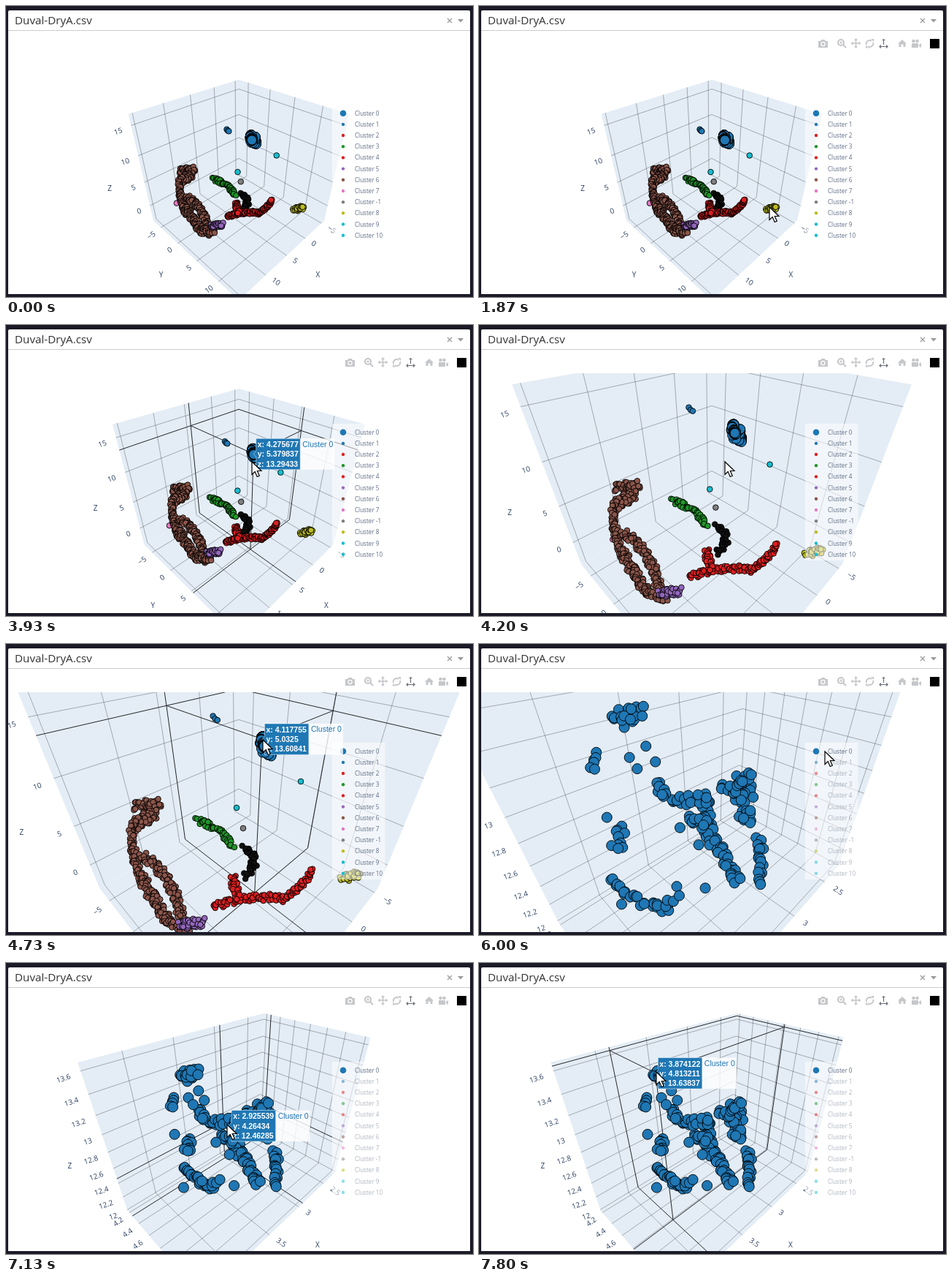
These frames come from a looping animation (640 by 398 pixels, 8 s). An HTML page with a canvas:

```html
<!DOCTYPE html>
<html lang="en">
<head>
<meta charset="utf-8">
<title>3D cluster plot</title>
<style>
html, body { margin: 0; width: 100%; height: 100%; overflow: hidden; background: #1a1b26; }
canvas, svg { position: absolute; left: 0; top: 0; width: 640px; height: 398px; }
.ui { font-family: "Open Sans", sans-serif; }
.tip { font: 10.5px "Liberation Sans", Arial, sans-serif; }
</style>
</head>
<body>
<canvas id="scene" width="640" height="398"></canvas>
<svg class="ui" viewBox="0 0 640 398">
  <path d="M3 8q0-2 2-2H634q2 0 2 2V33.5H3z" fill="#fff"/>
  <path d="M3 33.5H636" stroke="#ccc"/>
  <text x="12" y="25" font-size="15.2" fill="#333">Duval-DryA.csv</text>
  <path d="M605 17l6 6m0-6l-6 6" stroke="#999" stroke-width="1.2"/>
  <path d="M619 18h8l-4 4.5z" fill="#999"/>

  <g id="bar" fill="#c6c7ca" stroke="#c6c7ca" stroke-width="0">
    <path d="M465 48h3l1.5-2h4l1.5 2h3v9h-13z"/>
    <circle cx="471.5" cy="52" r="2.6" stroke="#fff" stroke-width="1.2"/>
    <g fill="none" stroke-width="2.2">
      <circle cx="496" cy="50" r="4"/><path d="M499 53l4 4"/>
      <path d="M494 50h4m-2-2v4" stroke-width="1.2"/>
      <path d="M511 51h11m-5.5-5.5v11" stroke-width="1.6"/>
      <path d="M531 53a4.5 4.5 0 0 1 7-5M540 50a4.5 4.5 0 0 1-7 5" stroke-width="1.8"/>
    </g>
    <path d="M516.5 44l2.5 3h-5zM516.5 58l2.5-3h-5zM509.5 51l3-2.5v5zM523.5 51l-3-2.5v5zM537 45h4v4zM534 57.5h-4v-4z"/>
    <g fill="none" stroke="#6d7078" stroke-width="1.2">
      <path d="M554.5 45v8M552.5 46.500h4M549 55.500h11"/>
      <path d="M551 53.500l-2 2 2 2M558 53.500l2 2-2 2"/>
    </g>
    <path d="M574 51.5l6-5.5 6 5.5h-1.5v4.5h-3v-3.5h-3v3.5h-3v-4.5z"/>
    <path d="M593 51h9v6h-9zM603 53l3-2v6l-3-2z"/>
    <circle cx="595.5" cy="48" r="2.3"/><circle cx="600.5" cy="48" r="2.3"/>
    <path d="M618 45h13v13h-13z" fill="#000"/>
  </g>

  <g id="legend">
    <rect x="447" y="135" width="72.5" height="187" fill="#fff" opacity=".55"/>
  </g>

  <g id="hover" class="tip">
    <rect id="pale" width="47" height="42.5" fill="#fff" opacity=".8"/>
    <path id="box"/>
    <text id="tx"/><text id="ty"/><text id="tz"/><text id="name"/>
  </g>

  <path id="cursor" d="M0 0V17.5L4.2 13.6L7.2 20.5L10.3 19.2L7.3 12.5H13z"
    fill="#fff" stroke="#000" stroke-width="1.2"/>
  <path d="M0 0H640V5H0zM0 394H640V398H0zM0 0H3V398H0zM636 0H640V398H636z" fill="#1a1b26"/>
</svg>
<script>
const LOOP = 8000, CX = 319, CY = 230, F = 396;
const START = 2.165, CLOSE = 1.22, INSIDE = 1.374; // camera distances
const ISOLATED = 6000;
const BLUE = '#1f77b4', RED = '#dc2022', PURPLE = '#9467bd', BROWN = '#8c564b',
  GREEN = '#20962a', PINK = '#e377c2', GRAY = '#7f7f7f', OLIVE = '#bcbd22', CYAN = '#17becf';
const $ = id => document.getElementById(id);
const ctx = $('scene').getContext('2d');

// half: box half sizes, min: data at the low corner, unit: scene units per data unit
const ALL = { half: [.51, .51, .48], min: [-5.89, -7.38, -3.5], unit: .0475, step: [5, 5, 5] };
const ONE = { half: [.64, .387, .505], min: [2.226, 4.158, 11.99], unit: .602, step: [.5, .2, .2] };

// Moves are [start, end, ...value reached]
const zooms = [[3400, 3930, 1.928], [3990, 4200, 1.32], [4270, 4470, CLOSE],
  [6330, 6670, INSIDE], [6730, 7130, 1.74]];
const walks = [[230, 730, 409, 322], [870, 1330, 391, 300], [1530, 1870, 398, 275],
  [2800, 3200, 337, 187], [4270, 4730, 352, 131], [5000, 5330, 474, 147],
  [6330, 6530, 303, 221], [7200, 7600, 243, 149]];
const hovers = [
  { from: 1930, to: 2870, at: [1.096602, 12.7187, 2.612308], name: 'Cluster 8', color: OLIVE, ink: '#444' },
  { from: 3200, to: 4200, at: [4.275677, 5.379837, 13.29433] },
  { from: 4730, to: 5070, at: [4.117755, 5.0325, 13.60841] },
  { from: 6560, to: 7270, at: [2.925539, 4.26434, 12.46285] },
  { from: 7560, to: LOOP, at: [3.874122, 4.813211, 13.63837] }
];

function follow(value, moves, t) {
  for (const [start, end, ...to] of moves) {
    const f = Math.min(1, Math.max(0, (t - start) / (end - start)));
    value = value.map((v, i) => v + (to[i] - v) * f);
  }
  return value;
}

let seed = 7;
const rnd = () => (seed = (seed * 16807) % 2147483647) / 2147483647;

// Points live in camera space: r right, u up, q towards the eye
function dot(list, d, color, q, [x, y]) {
  const w = (d - q) / F;
  list.push({ color, q, r: (x - CX) * w, u: (CY - y) * w });
}

// Scatter points along a bowed strand on screen; the count follows its area
function strand(list, d, area, color, q, spread, [x0, y0], [x1, y1], bow = 0) {
  const dx = x1 - x0, dy = y1 - y0, len = Math.hypot(dx, dy);
  const n = Math.ceil(len * spread / area);
  for (let i = 0; i <= n; i++) {
    const s = i / n, lift = 4 * s * (1 - s) * bow / len;
    const a = rnd() * 2 * Math.PI, r = spread * Math.sqrt(rnd());
    dot(list, d, color, q, [x0 + dx * s - dy * lift + Math.cos(a) * r, y0 + dy * s + dx * lift + Math.sin(a) * r]);
  }
}

const others = [], focus = [];
const far = (...args) => strand(others, CLOSE, 5.5, ...args);
const near = (...args) => strand(focus, INSIDE, 16, BLUE, ...args);
const lone = (color, q, at) => dot(others, CLOSE, color, q, at);

far(BROWN, 0, 7, [176, 222], [209, 218]);
far(BROWN, 0, 9, [202, 231], [174, 250]);
far(BROWN, .05, 5, [172, 250], [188, 330], 4);
far(BROWN, .15, 8, [184, 318], [225, 385]);
far(BROWN, .15, 7, [188, 290], [240, 388], -14);
far(BROWN, .3, 6, [214, 378], [250, 391]);
far(PURPLE, .42, 7, [238, 386], [271, 379]);
far(GREEN, -.22, 4.5, [262, 241], [311, 276], -5);
far('#111', 0, 5, [328, 276], [326, 318], -13);
far(RED, .45, 5, [286, 359], [380, 348], -6);
far(RED, .45, 4, [377, 350], [421, 308], 4);
far(RED, .46, 6, [309, 318], [316, 344]);
far(OLIVE, .13, 6, [461, 320], [485, 316]);
far(BLUE, .395, 1.5, [284, 99], [289, 103]);
lone(PINK, -.1, [173, 298]);
lone(CYAN, -.25, [404, 188]);
lone(CYAN, .3, [316, 224]);
lone(GRAY, .4, [325, 252]);

near(.48, 11, [212, 129], [238, 119], -5);
near(.55, 4, [187, 164], [187, 184]);
near(-.2, 6, [251, 196], [262, 212]);
near(-.3, 7, [270, 216], [310, 215]);
near(-.44, 8, [308, 214], [318, 260]);
near(-.44, 7, [288, 240], [310, 246]);
near(-.33, 11, [338, 200], [364, 190]);
near(-.35, 12, [357, 198], [363, 238]);
near(-.5, 5, [379, 262], [381, 318]);
near(-.4, 8, [322, 268], [350, 315]);
near(.6, 7, [222, 247], [215, 270]);
near(.6, 5, [207, 305], [242, 330]);
near(.5, 7, [248, 336], [279, 330], 3);
for (const at of [[243, 154], [224, 167], [233, 180], [254, 172], [198, 236], [215, 336]])
  dot(focus, INSIDE, BLUE, .4, at);
for (const at of [[280, 249], [303, 270], [276, 321], [311, 323]])
  dot(focus, INSIDE, BLUE, -.1, at);

const byDepth = (a, b) => a.q - b.q;
focus.sort(byDepth);
// The isolated cluster, shrunk to its place among the others
const shrink = ALL.unit / ONE.unit;
const small = focus.map(p => ({ color: BLUE, big: true,
  r: .1 + p.r * shrink, u: .245 + p.u * shrink, q: .166 + p.q * shrink }));
const everything = others.concat(small).sort(byDepth);

let dist = START, view = ALL;
const project = (r, u, q) => [CX + F * r / (dist - q), CY - F * u / (dist - q)];
const place = ([x, y, z]) =>
  project((y - x) * Math.SQRT1_2, (2 * z - x - y) / Math.sqrt(6), (x + y + z) / Math.sqrt(3));
const toBox = (v, i) => (v - view.min[i]) * view.unit - view.half[i];

function path(points) {
  ctx.beginPath();
  points.forEach(p => ctx.lineTo(...place(p)));
}

// The low corner, with some coordinates replaced
const corner = change => view.half.map((h, i) => change[i] ?? -h);

// Lines at value v of axis i on the two back walls that carry it
function wallLines(i, v) {
  for (const k of [0, 1, 2].filter(k => k !== i)) {
    path([corner({ [i]: v }), corner({ [i]: v, [k]: view.half[k] })]);
    ctx.stroke();
  }
}

function label(text, x, y, angle, align) {
  ctx.save();
  ctx.translate(x, y);
  ctx.rotate(angle * Math.PI / 180);
  ctx.textAlign = align;
  ctx.fillText(text, 0, 0);
  ctx.restore();
}

const axes = [
  { edge: v => corner({ 0: v, 1: view.half[1] }), tick: [9, 6], turn: 35, align: 'left', title: [42, 28] },
  { edge: v => corner({ 0: view.half[0], 1: v }), tick: [-8, 8], turn: -35, align: 'right', title: [-40, 28] },
  { edge: v => corner({ 0: view.half[0], 2: v }), tick: [-12, 7], turn: -18, align: 'right', title: [-45, 20] }
];

function drawAxes() {
  const grow = (START / dist) ** .6;
  ctx.fillStyle = '#e4edf5';
  for (let i = 0; i < 3; i++) {
    const j = (i + 1) % 3, hi = view.half[i], hj = view.half[j];
    path([corner({}), corner({ [i]: hi }), corner({ [i]: hi, [j]: hj }), corner({ [j]: hj })]);
    ctx.fill();
  }
  ctx.font = '10px "Open Sans", sans-serif';
  ctx.textBaseline = 'middle';
  ctx.fillStyle = '#2a3f5f';
  ctx.strokeStyle = 'rgba(60,64,74,.5)';
  ctx.lineWidth = .8;
  axes.forEach(({ edge, tick, turn, align, title }, i) => {
    const step = view.step[i], max = view.min[i] + 2 * view.half[i] / view.unit;
    for (let n = Math.ceil(view.min[i] / step); n * step < max; n++) {
      const v = toBox(n * step, i), [x, y] = place(edge(v));
      wallLines(i, v);
      const text = String(+(n * step).toFixed(1)).replace('-', '−');
      label(text, x + tick[0] * grow, y + tick[1] * grow, turn, align);
    }
    const [x, y] = place(edge(0));
    label('XYZ'[i], x + title[0] * grow, y + title[1] * grow, 0, 'center');
  });
}

function drawSpikes(at) {
  ctx.strokeStyle = '#24262c';
  ctx.lineWidth = 1;
  at.forEach((v, i) => {
    wallLines(i, v);
    path([at, at.map((p, k) => k === i ? -view.half[k] : p)]);
    ctx.stroke();
  });
}

function drawPoints(list, allBig) {
  ctx.strokeStyle = '#000';
  ctx.lineWidth = .9;
  for (const p of list) {
    ctx.beginPath();
    ctx.arc(...project(p.r, p.u, p.q), allBig ? 7 : p.big ? 6.5 : 3.8, 0, 7);
    ctx.fillStyle = p.color;
    ctx.fill();
    ctx.stroke();
  }
}

function set(id, attrs) {
  for (const key in attrs) $(id).setAttribute(key, attrs[key]);
}

function write(id, text, attrs) {
  $(id).textContent = text;
  set(id, attrs);
}

function drawTip({ at, color = BLUE, ink, name = 'Cluster 0' }, [px, py]) {
  const x = px + 3.5, top = py - 21, right = x + 60.5;
  at.forEach((v, i) => write('t' + 'xyz'[i], 'xyz'[i] + ': ' + v,
    { x: x + 2, y: top + 12 + 13.2 * i, fill: ink || '#fff', 'font-weight': ink ? 400 : 700 }));
  write('name', name, { x: right + 3, y: top + 11.5, fill: color });
  set('box', {
    d: `M${px} ${py}L${x} ${py - 4}V${top}H${right}v42.5H${x}V${py + 4}z`,
    fill: color, stroke: ink || '#fff', 'stroke-width': ink ? .9 : .5
  });
  set('pale', { x: right, y: top });
}

const swatches = [BLUE, BLUE, RED, GREEN, RED, PURPLE, BROWN, PINK, GRAY, OLIVE, CYAN, CYAN];
const rows = swatches.map((color, i) => {
  const g = document.createElementNS('http://www.w3.org/2000/svg', 'g'), y = 146.7 + 15.18 * i;
  const number = i < 8 ? i : i === 8 ? -1 : i - 1;
  g.innerHTML = `<circle cx="462" cy="${y}" r="${i ? 2.2 : 4.3}" fill="${color}"/>
    <text x="478" y="${y + 3}" font-size="8.1" fill="#5d6b82">Cluster ${number}</text>`;
  $('legend').append(g);
  return g;
});

const show = (id, on) => $(id).style.display = on ? '' : 'none';

function frame(now) {
  const t = now % LOOP, alone = t >= ISOLATED;
  [dist] = follow([START], zooms, t);
  view = alone ? ONE : ALL;
  const h = hovers.find(e => t >= e.from && t < e.to);
  const at = h && h.at.map(toBox);

  ctx.fillStyle = '#fff';
  ctx.fillRect(3, 33, 633, 361);
  ctx.save();
  ctx.beginPath();
  ctx.rect(3, 66, 633, 328);
  ctx.clip();
  drawAxes();
  if (h) drawSpikes(at);
  drawPoints(alone ? focus : everything, alone);
  ctx.restore();

  if (h) drawTip(h, place(at));
  show('hover', h);
  show('bar', t >= 270);
  show('cursor', t >= 230);
  rows.forEach((g, i) => g.style.opacity = alone && i ? .5 : 1);
  set('cursor', { transform: `translate(${follow([630, 392], walks, t)})` });
  requestAnimationFrame(frame);
}
requestAnimationFrame(frame);
</script>
</body>
</html>
```
